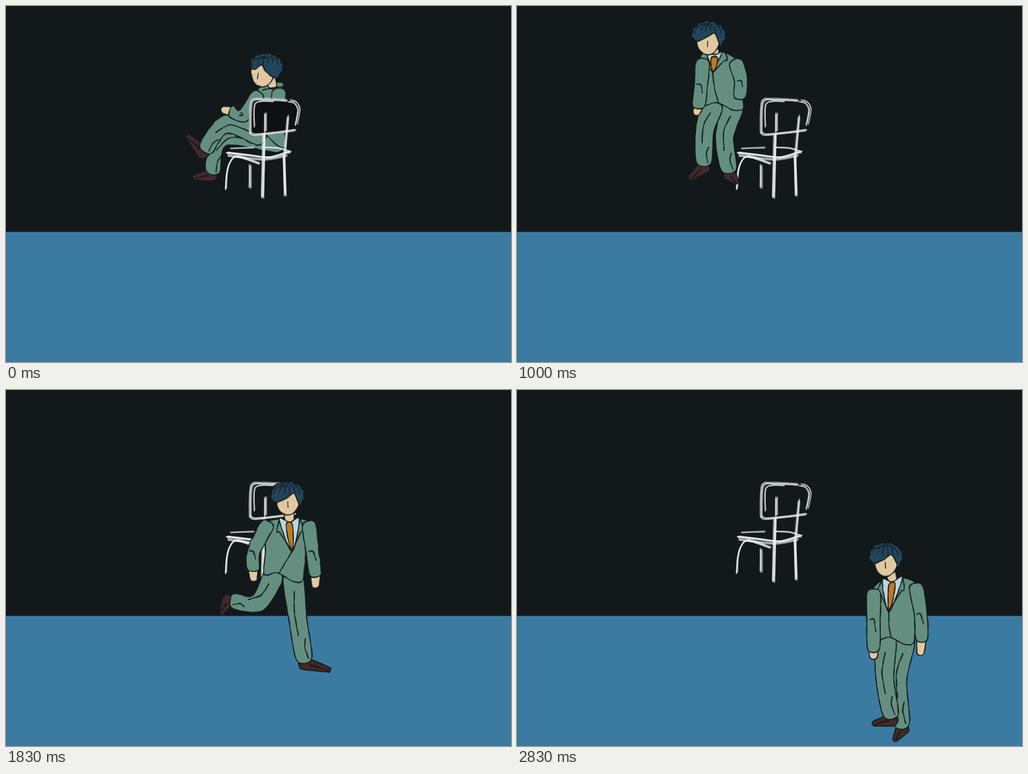
An HTML page with a canvas that plays this animation: 891 px wide and 628 px high, repeating every 3000 ms.

```html
<!DOCTYPE html>
<html lang="en">
<head>
<meta charset="utf-8">
<title>Man and chair</title>
<style>
html, body { margin: 0; width: 100%; height: 100%; overflow: hidden; background: #13191b; }
canvas { display: block; width: 100%; height: 100%; }
</style>
</head>
<body>
<canvas id="stage" width="891" height="628"></canvas>
<script>
const ctx = document.getElementById('stage').getContext('2d');
const LOOP = 3000, DRAWINGS = 18;
const WALL = '#13191b', FLOOR = '#3b7ba2', INK = '#111918', SUIT = '#648f80', SKIN = '#e2c8a0';
const SHOE = '#42292a', HAIR = '#22455c', SHIRT = '#bcd4e1', TIE = '#c17a1c';

let seed = 1;
function rand() {
  seed = (seed * 16807) % 2147483647;
  return seed / 2147483647;
}
const jitter = a => (rand() - .5) * 2 * a;

const mix = (a, b, t) => a + (b - a) * t;
const lerp = (a, b, t) => [mix(a[0], b[0], t), mix(a[1], b[1], t)];
const add = (p, d, k = 1) => [p[0] + d[0] * k, p[1] + d[1] * k];
const normal = d => [-d[1], d[0]];
function dir(a, b) {
  const x = b[0] - a[0], y = b[1] - a[1], l = Math.hypot(x, y) || 1;
  return [x / l, y / l];
}
const parse = s => s.split(' ').map(p => p.split(',').map(Number));

// A pose: head tilt, head turn, how far the chest faces us, then the joints.
// Arms run shoulder, elbow, wrist, fingertips; legs run knee, ankle, toe.
function pose(tilt, turn, front, core, armA, armB, legA, legB) {
  return { look: [tilt, turn, front], core: parse(core), armA: parse(armA), armB: parse(armB),
    legA: parse(legA), legB: parse(legB) };
}

// Core points: head, neck, button, both ends of the jacket hem.
const crossed = pose(0, -1, 0, '459,108 470,138 460,141 434,222 494,246',
  '444,158 418,193 397,185 386,184', '482,152 478,190 470,200 468,204',
  '387,209 352,252 322,231', '383,232 364,291 334,302');
const leaning = pose(.22, -.15, 0, '404,128 430,148 426,160 425,225 494,240',
  '427,170 424,205 418,243 407,255', '478,165 478,190 470,200 468,204',
  '386,234 374,309 338,321', '417,250 414,304 397,315');
const standing = pose(0, 0, 1, '316,63 321,97 319,140 294,195 368,196',
  '294,113 291,155 288,192 287,201', '356,116 368,150 367,186 365,200',
  '313,252 315,304 297,334', '349,262 361,322 382,345');
const striding = pose(0, 0, 1, '497,186 500,227 504,285 455,325 524,335',
  '461,238 437,285 436,317 437,331', '535,238 541,285 546,326 546,343',
  '444,376 400,372 381,392', '515,405 526,475 568,493');
const turning = pose(-.05, .35, 1, '590,193 580,234 577,295 522,343 594,352',
  '544,247 526,290 514,338 512,349', '606,258 610,300 601,352 602,338',
  '538,405 542,471 548,488', '563,405 556,469 590,487');
const walking = pose(0, -.1, 1, '713,261 714,295 711,352 680,402 756,402',
  '680,306 676,355 672,396 671,406', '750,308 766,350 770,397 770,409',
  '687,472 693,543 671,568', '735,455 727,507 726,522');
const halted = pose(0, -.05, 1, '651,294 662,333 656,391 634,440 701,444',
  '629,358 629,405 629,458 629,468', '704,348 712,395 714,440 712,461',
  '649,510 660,574 632,588', '672,512 679,590 668,615');

// Each key holds its drawing number, the easing towards the next key and a hop height.
const linear = s => s;
const KEYS = [
  { at: 0, pose: crossed, ease: s => s ** 4 },
  { at: 4, pose: leaning, ease: s => s * (2 - s), hop: 28 },
  { at: 8, pose: standing, ease: s => s ** 1.5 },
  { at: 11, pose: striding, ease: linear },
  { at: 13, pose: turning, ease: linear },
  { at: 15, pose: walking, ease: linear },
  { at: 17, pose: halted, ease: linear }
];

function poseAt(i) {
  const n = KEYS.findLastIndex(k => k.at <= i), a = KEYS[n], b = KEYS[n + 1] || a;
  const s = (i - a.at) / (b.at - a.at || 1), t = a.ease(s);
  const lift = [0, -(a.hop || 0) * Math.sin(Math.PI * s)];
  const out = { look: a.pose.look.map((v, j) => mix(v, b.pose.look[j], t)) };
  for (const k of ['core', 'armA', 'armB', 'legA', 'legB'])
    out[k] = a.pose[k].map((p, j) => add(lerp(p, b.pose[k][j], t), lift));
  return out;
}

// Smooth path through the points.
function trace(pts, closed, wobble = 0, k = 1 / 7) {
  const n = pts.length;
  const w = wobble ? pts.map(p => [p[0] + jitter(wobble), p[1] + jitter(wobble)]) : pts;
  const at = i => closed ? w[(i + n) % n] : w[Math.max(0, Math.min(n - 1, i))];
  ctx.beginPath();
  ctx.moveTo(...w[0]);
  for (let i = 0; i < (closed ? n : n - 1); i++) {
    const a = at(i - 1), b = at(i), c = at(i + 1), d = at(i + 2);
    ctx.bezierCurveTo(b[0] + (c[0] - a[0]) * k, b[1] + (c[1] - a[1]) * k,
      c[0] - (d[0] - b[0]) * k, c[1] - (d[1] - b[1]) * k, c[0], c[1]);
  }
  if (closed) ctx.closePath();
}

// Ink is one firm pass and one loose, broken pass.
function ink(pts, closed, width = 1.8) {
  ctx.strokeStyle = INK;
  ctx.globalAlpha = .85;
  ctx.lineWidth = width;
  trace(pts, closed, .5);
  ctx.stroke();
  ctx.globalAlpha = .65;
  ctx.setLineDash([12 + rand() * 12, 6 + rand() * 8]);
  trace(pts, closed, 1.3);
  ctx.stroke();
  ctx.setLineDash([]);
  ctx.globalAlpha = 1;
}

function shape(pts, fill) {
  trace(pts, true);
  ctx.fillStyle = fill;
  ctx.fill();
  ink(pts, true);
}

// Sleeve or trouser leg around three joints.
function limb(a, b, c, widths) {
  const sides = [[a, dir(a, b)], [b, dir(a, c)], [c, dir(b, c)]];
  const edge = s => sides.map(([p, d], i) => add(p, normal(d), s * widths[i]));
  const cap = add(a, dir(a, b), -widths[0] * .6);
  shape([cap, ...edge(1), ...edge(-1).reverse()], SUIT);
}

function capsule(a, b, r0, r1, fill) {
  const base = Math.atan2(b[1] - a[1], b[0] - a[0]) + Math.PI / 2, pts = [];
  for (let i = 0; i < 10; i++) {
    const end = i < 5, g = base + Math.PI * (i % 5 / 4 + (end ? 0 : 1));
    pts.push(add(end ? a : b, [Math.cos(g), Math.sin(g)], end ? r0 : r1));
  }
  shape(pts, fill);
}

function leg(hip, [knee, ankle, toe]) {
  const down = dir(knee, ankle), heel = add(ankle, down, 8);
  capsule(heel, toe, 11, 5, SHOE);
  ink([lerp(heel, toe, .2), add(toe, down, 2)], false);
  limb(hip, knee, ankle, [18, 16, 13]);
  const across = normal(down);
  ink([lerp(hip, knee, .3), add(lerp(hip, knee, .8), across, 5), add(lerp(knee, ankle, .4), across, 4)], false);
  ink([add(lerp(knee, ankle, .5), across, -8), add(lerp(knee, ankle, .7), across, -4), add(ankle, across, -7)], false);
}

function arm([shoulder, elbow, wrist]) {
  limb(shoulder, elbow, wrist, [12, 11.5, 10]);
  const n = normal(dir(shoulder, wrist));
  ink([add(elbow, n, 7), elbow, add(lerp(elbow, wrist, .4), n, -4)], false);
}

function jacket(p, front) {
  const [, neck, button, hemA, hemB] = p.core, shA = p.armA[0], shB = p.armB[0];
  const u = dir(shA, shB), collarA = add(neck, u, -18), collarB = add(neck, u, 18);
  const dip = lerp(hemA, hemB, .35);
  shape([collarA, add(shA, u, -5), lerp(shA, hemA, .5), hemA, add(dip, [0, -6]),
    add(lerp(hemA, hemB, .75), [0, 6]), hemB, lerp(shB, hemB, .5), add(shB, u, 5), collarB], SUIT);
  capsule(lerp(p.core[0], neck, .5), neck, 9, 8, SKIN);
  if (front < .3) {
    ink([add(collarA, [0, 8]), add(neck, [0, 6]), add(collarB, [0, 7])], false);
    return;
  }
  shape([collarA, add(neck, [0, 6]), collarB, button].map(q => lerp(neck, q, front)), SHIRT);
  const knot = add(neck, [0, 9]), drop = lerp(knot, button, .6);
  shape([add(knot, u, -5), add(knot, u, 5), add(drop, u, 5), lerp(knot, button, .95), add(drop, u, -4)], TIE);
  for (const [collar, side] of [[collarA, -1], [collarB, 1]]) {
    const notch = add(lerp(collar, button, .42), u, side * 13);
    ink([collar, add(notch, [0, -8]), notch, add(notch, u, -side * 5), button], false);
  }
  ink([button, lerp(button, dip, .5), add(dip, [3, -5])], false);
}

function head(centre, [tilt, turn]) {
  const c = Math.cos(tilt), s = Math.sin(tilt);
  const local = (x, y) => add(centre, [x * c - y * s, x * s + y * c]);
  const oval = Array.from({ length: 12 }, (_, i) => {
    const g = i * Math.PI / 6;
    return local(turn * 7 + 20 * Math.cos(g) * (1 - .12 * Math.sin(g)), 13 + 22 * Math.sin(g));
  });
  shape(oval, SKIN);
  ink([local(turn * 14, 10), local(turn * 16, 21)], false, 1.2);

  // Tufted crown over the top, then the fringe back across the forehead.
  const crown = [], from = 160 - 40 * turn, to = 385, tufts = 16;
  for (let i = 0; i <= tufts; i++) {
    const g = mix(from, to, i / tufts) * Math.PI / 180, r = i % 2 ? 1.02 : .95;
    crown.push(local(30 * r * Math.cos(g), 25 * r * Math.sin(g)));
  }
  const low = 1 + .8 * Math.min(0, turn), shift = .6 * turn;
  const fringe = [[.75 - shift * .75, .8], [.6, .35], [.35, -.15], [-.05, .15], [-.35, .35 * low], [-.65, .5 * low]]
    .map(([x, y]) => local(30 * Math.max(-.9, x + shift), 25 * y));
  shape([...crown, ...fringe], HAIR);
  for (let i = 0; i < 6; i++) {
    const x = mix(-22, 20, i / 5), root = local(4 + x * .3, -20 + jitter(3));
    ink([root, local(x * .9, -13 + jitter(2)), local(x * 1.1, -4 + jitter(4))], false, 1.2);
  }
}

function drawMan(p) {
  const [, , front] = p.look, [, , , hemA, hemB] = p.core;
  leg(lerp(hemA, hemB, .75), p.legB);
  leg(lerp(hemA, hemB, .25), p.legA);
  for (const a of [p.armA, p.armB]) capsule(a[2], a[3], 8, 7, SKIN);
  jacket(p, front);
  arm(p.armA);
  arm(p.armB);
  head(p.core[0], p.look);
}

// A chalk line is a bundle of thin, uneven strands.
function chalk(path, width, strength = .8) {
  const pts = parse(path);
  ctx.lineWidth = 1.5;
  for (let i = 0; i < width * 1.6; i++) {
    const off = [jitter(width / 2), jitter(width / 2)];
    ctx.strokeStyle = `rgba(240,242,242,${strength * (.45 + rand() * .5)})`;
    trace(pts.map(q => add(q, off)), false, .5);
    ctx.stroke();
  }
}

function drawChair(seated) {
  seed = 77;
  if (seated) {
    trace(parse('432,169 455,164 496,166 515,178 512,217 455,227 430,222'), true);
    ctx.fillStyle = '#0d1113';
    ctx.fill();
  }
  // Backrest
  chalk('431,222 433,169 455,164 496,166', 4, .7);
  chalk('438,213 440,172 472,168', 2, .6);
  chalk('500,167 511,170 517,182 512,209', 5, .65);
  chalk('430,222 440,227 480,223 511,219', 3);
  // Posts and legs
  chalk('458,190 458,222', 6, .55);
  chalk('455,226 452,338', 5, .95);
  chalk('498,194 492,262', 6, .6);
  chalk('491,264 493,333', 7);
  chalk('388,323 390,297 395,277 408,265 448,278', 4);
  chalk('431,280 431,320', 5, .65);
  // Seat
  chalk('396,251 438,249', 2, .75);
  chalk('455,250 482,251 502,258', 2.5);
  chalk('390,260 425,264 465,268 502,258', 5, .9);
  chalk('392,264 454,271 497,264', 3);
}

function draw(now) {
  const t = now % LOOP;
  let i = DRAWINGS - 1;
  while (Math.floor(i * 100 / 6) * 10 > t) i--;
  ctx.fillStyle = WALL;
  ctx.fillRect(0, 0, 891, 628);
  ctx.fillStyle = FLOOR;
  ctx.fillRect(0, 398.5, 891, 230);
  const seated = i < 6;
  if (!seated) drawChair(false);
  seed = 1000 + i * 37;
  drawMan(poseAt(i));
  if (seated) drawChair(true);
}

ctx.lineJoin = 'round';
const start = performance.now();
function tick() {
  draw(performance.now() - start);
  requestAnimationFrame(tick);
}
tick();
</script>
</body>
</html>
```
